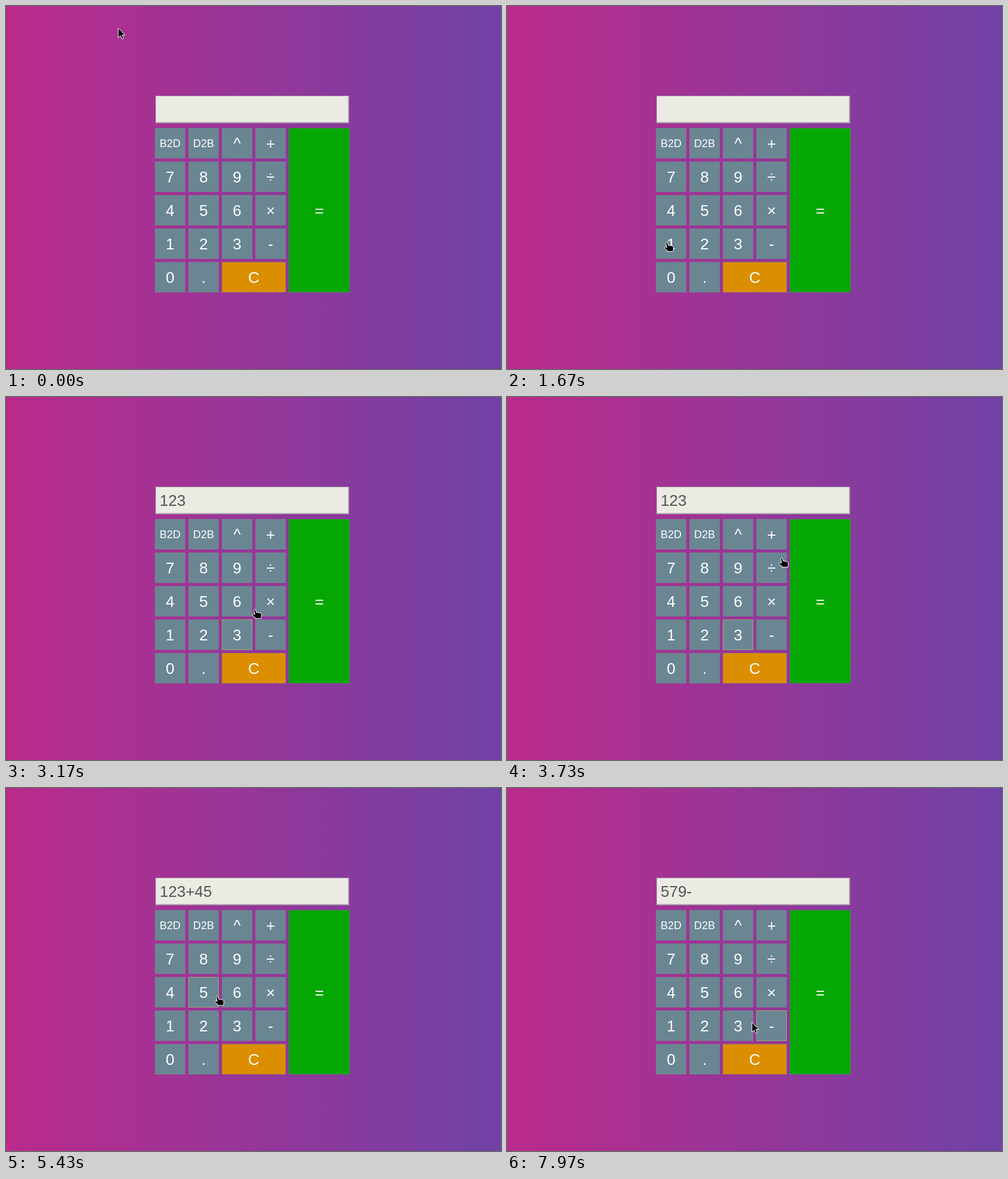
Animation, 828 px wide and 607 px high, one loop 8 s. Source, as an HTML page:

```html
<!DOCTYPE html>
<html lang="en">
<head>
<meta charset="utf-8">
<title>Calculator</title>
<style>
  html, body { margin: 0; width: 100%; height: 100%; overflow: hidden; }
  body {
    position: relative; background: linear-gradient(to right, #bb2b8b, #7042a6);
    font: 26px/50px "Liberation Sans", Arial, sans-serif;
  }
  #display {
    position: absolute; left: 250px; top: 150px; width: 324px; height: 46px; box-sizing: border-box;
    padding-left: 6px; border: solid #b0a6b0; border-width: 1px 2px 2px 1px;
    background: #ebebe4; color: #545454; line-height: 44px;
  }
  #keys {
    position: absolute; left: 249px; top: 204px; display: grid; gap: 5px;
    grid-template: repeat(5, 51px) / repeat(4, 51px) 102px;
  }
  #keys div {
    box-sizing: border-box; border: 1px solid rgba(128, 120, 136, .5);
    background: #6a8693; color: #fff; text-align: center;
  }
  #keys .small { font-size: 18px; }
  #keys .clear { grid-column: span 2; background: #db8f00; }
  #keys .equals { grid-area: 1 / 5 / span 5; background: #05a705; line-height: 274px; }
  #keys .focus { border-color: #92b36c; }
  #cursor { position: absolute; left: 0; top: 0; overflow: visible; }
  #cursor path { stroke: #fff; stroke-linejoin: round; }
</style>
</head>
<body>
<div id="display"></div>
<div id="keys"></div>
<svg id="cursor" width="20" height="20"><path/></svg>
<script>
const LOOP = 8000, CLICK = 40, HAND_FROM = 1670, HAND_UNTIL = 7870;
const ARROW = "M.7 1V17.2L4.5 13.6L7 19.2L9.7 18L7.3 12.5H12.2Z";
const HAND = "M3.6 2Q4.6 .2 6.2 1.5L8 6.2L13.6 7Q16.5 7.6 16.5 10L15.8 16.5H6V14.8L1 11.2Q.6 8.8 2.8 9L5.4 9.6Z";

const display = document.getElementById("display");
const keys = document.getElementById("keys");
const cursor = document.getElementById("cursor");

const keyBoxes = {};
for (const label of "B2D D2B ^ + 7 8 9 ÷ 4 5 6 × 1 2 3 - 0 . C =".split(" ")) {
  const key = keyBoxes[label] = document.createElement("div");
  key.textContent = label;
  key.className = label.length > 1 ? "small" : { C: "clear", "=": "equals" }[label] || "";
  keys.append(key);
}

// [time, key]
const presses = [[1800, "1"], [2300, "2"], [2870, "3"], [3950, "+"], [4830, "4"], [5300, "5"], [6700, "6"], [7230, "-"]];

// Pointer stops: [leave, arrive, x, y, sideways sway]
const stops = [
  [0, 0, 187, 36], [0, 830, 203, 261, -53], [1670, 1670, 262, 394], [1800, 2000, 338, 403],
  [2315, 2570, 383, 403], [2950, 3670, 457, 275], [3700, 3950, 440, 228], [4000, 4500, 293, 337],
  [4530, 4770, 275, 342], [4900, 5230, 342, 347], [5370, 5900, 381, 350],
  [6730, 6730, 444, 399], [7670, 7970, 409, 391],
];

// An operator first adds up a pending sum
function type(text, key) {
  const sum = /^(\d+)\+(\d+)$/.exec(text);
  return (sum && /\D/.test(key) ? +sum[1] + +sum[2] : text) + key;
}

function pointerAt(t) {
  const i = stops.findLastIndex(([leave]) => leave <= t);
  const [leave, arrive, x, y, sway = 0] = stops[i];
  const [, , x0, y0] = stops[Math.max(0, i - 1)];
  const p = t < arrive ? (t - leave) / (arrive - leave) : 1;
  const e = 1 - (1 - p) ** 1.3;
  return [x0 + (x - x0) * e + sway * Math.sin(Math.PI * e), y0 + (y - y0) * e].map(Math.round);
}

function render(t) {
  const focused = presses.findLast(([time]) => time <= t)?.[1];
  for (const label in keyBoxes) keyBoxes[label].classList.toggle("focus", label === focused);
  display.textContent = presses.filter(([time]) => time + CLICK <= t).reduce((text, [, key]) => type(text, key), "");

  const [x, y] = pointerAt(t);
  cursor.style.transform = `translate(${x}px, ${y}px)`;
  cursor.firstChild.setAttribute("d", t >= HAND_FROM && t < HAND_UNTIL ? HAND : ARROW);
}

const origin = performance.now();
function tick() {
  render((performance.now() - origin) % LOOP);
  requestAnimationFrame(tick);
}
tick();
</script>
</body>
</html>
```
